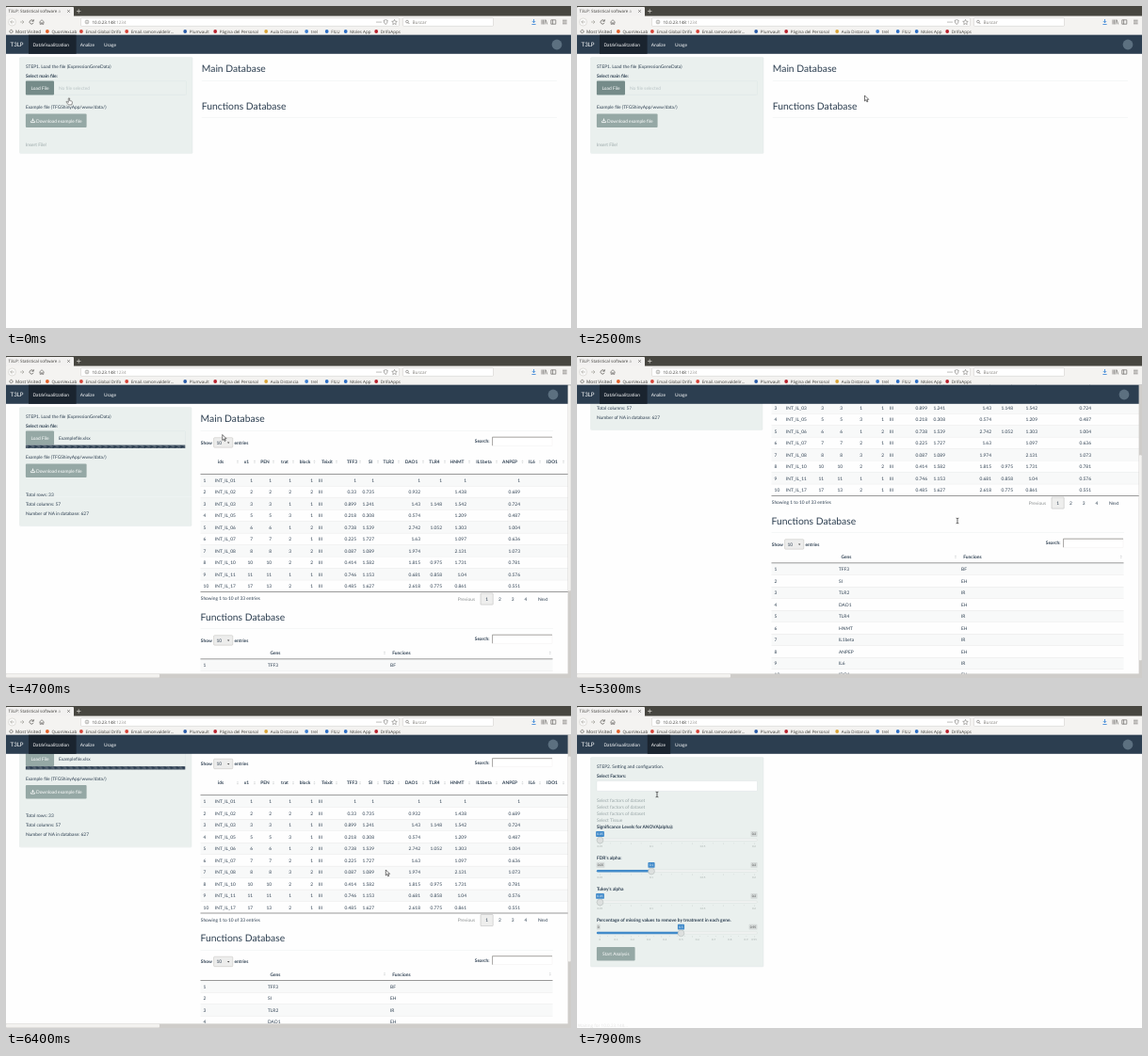
Write an HTML page that moves like this. It is 600 by 342 pixels and loops after 8 s.

```html
<!DOCTYPE html>
<html lang="en">
<head>
<meta charset="utf-8">
<title>T3LP</title>
<style>
html, body { margin: 0; width: 100%; height: 100%; overflow: hidden; background: #fefefe; }
svg { display: block; width: 600px; height: 342px; }
text { font-family: Lato, sans-serif; text-rendering: geometricPrecision; white-space: pre; }
.ui text { font-family: "Open Sans", "Noto Sans", sans-serif; }
</style>
</head>
<body>
<svg id="stage" viewBox="0 0 600 342" xmlns="http://www.w3.org/2000/svg"></svg>
<script>
const LOOP = 8000, TICK = 100;
const INK = '#2c3e50', GREY = '#98a5a6', PANEL = '#eaf0ee', BTN = '#95a8a5', BLUE = '#428bca';

// ---- drawing helpers; y of text is the middle of its capitals ----
const text = (x, y, s, o = {}) => {
  const size = o.size || 4.85;
  return `<text x="${x}" y="${y + size * 0.36}" font-size="${size}" fill="${o.fill || INK}"` +
    ` font-weight="${o.bold ? 700 : 400}" text-anchor="${o.at || 'start'}">${s}</text>`;
};
const bold = (x, y, s, o) => text(x, y, s, { bold: true, ...o });
const mid = (x, y, s, o) => text(x, y, s, { at: 'middle', ...o });
const rect = (x, y, x2, y2, fill, more = '') =>
  `<rect x="${x}" y="${y}" width="${x2 - x}" height="${y2 - y}" fill="${fill}" ${more}/>`;
const box = (x, y, x2, y2, fill, line, r = 1) =>
  rect(x, y, x2, y2, fill, `rx="${r}" stroke="${line}" stroke-width=".4"`);
const path = (d, line, width = 0.6, fill = 'none') =>
  `<path d="${d}" stroke="${line}" stroke-width="${width}" fill="${fill}"/>`;
const dot = (x, y, r, fill, more = '') => `<circle cx="${x}" cy="${y}" r="${r}" fill="${fill}" ${more}/>`;
const group = (id, body) => `<g id="${id}">${body}</g>`;
const hr = (y, x, x2) => rect(x, y, x2, y + 0.4, '#e6ebeb');

// ---- browser frame ----
const bookmarks = [
  [41.7, 'QuonVexLab', '#e2632c'], [77.7, 'Email Global Drifo', '#d5453a'],
  [126, 'Email.ramonvaldelir...', '#d5453a'], [188, 'Plumvault', '#2b5ca8'],
  [220, 'Página del Personal', '#b8232f'], [274, 'Aula Distancia', '#d9a53a'],
  [317, 'trel', '#3f7fd0'], [338.5, 'FILU', '#2f6fc4'],
  [358.5, 'Moles App', '#2f6fc4'], [391, 'DrifoApps', '#b8232f']
];
const browser = () => {
  const line = '#55534f', ui = { size: 4.75, fill: '#3c3b37' };
  return rect(0, 0, 600, 11, '#474640') +
    rect(0, 1, 72, 11.5, '#f2f1f0', 'rx="1"') +
    rect(0, 10.6, 600, 30.4, '#f4f3f1') +
    text(2.5, 5.5, 'T3LP: Statistical software a', { size: 4.5, fill: 'url(#fade)' }) +
    path('M65.2 4.2l2.6 2.6m0-2.6l-2.6 2.6', line) +
    path('M75 5.5h4.4M77.2 3.3v4.4', '#d8d6d0', 0.7) +
    dot(6.5, 17, 4, '#fbfbfa', 'stroke="#bbb8b2" stroke-width=".4"') +
    path('M8.6 17H4.8m1.7-1.8L4.7 17l1.8 1.8', '#a4a29d', 0.7) +
    path('M15 17h4m-1.8-1.8L19 17l-1.8 1.8', '#a4a29d', 0.7) +
    path('M28.9 15.8a2.1 2.1 0 1 0 .2 2M29.3 14.2v2h-2', line, 0.7) +
    path('M35.4 17.2L38 14.7l2.6 2.5M36.2 16.8v2.6h1.2v-1.6h1.2v1.6h1.2v-2.6', line, 0.6) +
    box(79.5, 12.7, 417.5, 21.4, '#fff', '#c0bdb8') +
    dot(86, 17, 1.9, 'none', `stroke="${line}" stroke-width=".4"`) + path('M86 16.6v1.6M86 15.6v.5', line, 0.5) +
    text(91.5, 17, '10.0.23.148<tspan fill="#9a9894">:1234</tspan>', { ...ui, size: 4.55 }) +
    [394, 396, 398].map(x => dot(x, 17, 0.5, line)).join('') +
    path('M401.2 15.2q2 0 2-.7q0 .7 2 .7q0 3.2-2 4.4q-2-1.2-2-4.4z', line, 0.5) +
    path('M412.5 14.4l.8 1.8 2 .2-1.5 1.3.4 2-1.7-1-1.7 1 .4-2-1.5-1.3 2-.2z', line, 0.45) +
    box(421.5, 12.7, 517.5, 21.4, '#fff', '#c0bdb8') +
    dot(426, 16.6, 1.4, 'none', `stroke="${line}" stroke-width=".5"`) + path('M427 17.6l1.4 1.4', line) +
    text(431.5, 17, 'Buscar', { ...ui, fill: '#84827d' }) +
    path('M560.5 14v3.6m-1.7-1.6l1.7 1.8 1.7-1.8M558.4 19.5h4.2', '#2f7fd6', 0.8) +
    path('M569 14.5v5M570.6 14.5v5M572.2 14.5v5M573.2 14.6l1.4 4.8', line) +
    path('M578.8 14.8h5v4.4h-5zM580.6 14.8v4.4', line) +
    path('M591 15.2h4.6M591 17h4.6M591 18.8h4.6', line) +
    dot(5.5, 27, 1.6, 'none', `stroke="${line}" stroke-width=".9" stroke-dasharray=".9 .35"`) +
    text(10, 27, 'Most Visited', ui) +
    bookmarks.map(([x, s, c]) => dot(x + 2.2, 27, 1.9, c) + text(x + 6.8, 27, s, { ...ui, size: 4.5 })).join('');
};

const navbar = () =>
  rect(0, 30.4, 600, 50.8, INK) +
  `<rect id="tab" y="30.4" height="20.4" fill="#1a242f"/>` +
  text(4.5, 41, 'T3LP', { size: 6.15, fill: '#fff' }) +
  [[28.5, 'DataVisualitzation'], [78.7, 'Analize'], [104, 'Usage']]
    .map(([x, s]) => text(x, 41.2, s, { fill: '#fff' })).join('') +
  dot(585, 41, 5.4, '#5c7080', 'id="logo"');

// ---- first step: file panel ----
const filePanel = (right, loaded, facts, dark) =>
  box(14.5, 54.6, right, facts ? 180.6 : 156.6, PANEL, '#dfe6e5') +
  text(20.9, 64, 'STEP1. Load the file (ExpressionGeneData)') +
  bold(20.9, 74, 'Select main file:') +
  box(51, 79.7, right - 6.5, 94.4, PANEL, '#d9e2e4') +
  rect(20.9, 79.5, 51, 94.6, dark ? '#758b89' : BTN, 'rx="1"') +
  mid(36, 87, 'Load File', { fill: '#fff' }) +
  text(56, 87, loaded ? 'Examplefile.xlsx' : 'No file selected', { fill: loaded ? INK : '#b9c3c5' }) +
  (loaded ? rect(20.9, 94.6, right - 6.7, 98, INK) +
    rect(20.9, 94.6, right - 6.7, 98, 'url(#stripes)') : '') +
  text(20.9, 107.5, 'Example file (TFGShinyApp/www/data/)') +
  rect(20.9, 114.4, 85.6, 129.1, BTN, 'rx="1"') +
  path('M28.5 119.5v2.4m-1.2-1l1.2 1.3 1.2-1.3M26.4 122.2v1.4h4.2v-1.4', '#fff', 0.8) +
  text(32, 121.8, 'Download example file', { fill: '#fff' }) +
  (facts ? facts.map((s, i) => text(20.9, 147 + i * 10.1, s)).join('')
    : text(20.9, 147, 'Insert File!', { fill: GREY }));

const emptyPage = loaded =>
  filePanel(198, loaded, null, !loaded) +
  text(207.8, 66.5, 'Main Database', { size: 10.35 }) + hr(79.3, 207.8, 585) +
  text(207.8, 105.8, 'Functions Database', { size: 10.35 }) + hr(118.3, 207.8, 585);

// ---- tables ----
const PITCH = 12.47;
const heads = [['ids', 228, 246], ['x1', 255.5, 264], ['PEN', 275, 284], ['trat', 296, 305],
  ['block', 317.5, 327.5], ['Teixit', 341, 351], ['TFF3', 367.5, 376], ['SI', 387, 395],
  ['TLR2', 406.3, 417], ['DAO1', 430.5, 443], ['TLR4', 455, 466], ['HNMT', 479, 492],
  ['IL1beta', 507.5, 521], ['ANPEP', 535, 548.5], ['IL6', 558.5, 567], ['IDO1', 580, 592]];
const rightEdges = [262, 282, 303, 326, 372, 391, 440, 463, 489, 546];
const samples = [
  '01 1 1 1 1 1 1 1 1 1 1', '02 2 2 2 2 0.33 0.735 0.932 - 1.438 0.689',
  '03 3 3 1 1 0.899 1.241 1.43 1.148 1.542 0.724', '05 5 5 3 1 0.218 0.308 0.574 - 1.209 0.487',
  '06 6 6 1 2 0.738 1.539 2.742 1.052 1.303 1.004', '07 7 7 2 1 0.225 1.727 1.63 - 1.097 0.636',
  '08 8 8 3 2 0.087 1.089 1.974 - 2.131 1.073', '10 10 10 2 2 0.414 1.582 1.815 0.975 1.731 0.781',
  '11 11 11 1 1 0.746 1.153 0.681 0.858 1.04 0.576', '17 17 13 2 1 0.485 1.627 2.618 0.775 0.861 0.551'];
const genes = 'TFF3:BF SI:EH TLR2:IR DAO1:EH TLR4:IR HNMT:EH IL1beta:IR ANPEP:EH IL6:IR IDO1:EH'.split(' ');

const sorter = (x, y) => path(`M${x - 1.1} ${y - 0.5}l1.1-1.3 1.1 1.3zM${x - 1.1} ${y + 0.5}l1.1 1.3 1.1-1.3z`, 'none', 0, '#cfd2d3');
const controls = y =>
  bold(206.8, y, 'Show') +
  box(220.6, y - 5.3, 240.8, y + 5.2, '#ededec', '#b3b1ad') +
  text(223.5, y, '10') + path(`M235 ${y - 0.6}h2.4l-1.2 1.5z`, 'none', 0, '#444') +
  bold(242.5, y, 'entries') +
  bold(513.6, y - 1.4, 'Search:', { at: 'end' }) +
  rect(516.4, y - 6, 580, y + 3.2, '#fff', 'stroke="#e6e5e3" stroke-width=".3"') +
  path(`M516.6 ${y + 3.2}v-9H580`, '#6f6d69', 0.6);
const stripesAt = (i, top, x2) =>
  rect(206.5, top + i * PITCH, x2, top + (i + 1) * PITCH, i % 2 ? '#fefefe' : '#f8f9f9') +
  (i ? rect(206.5, top + i * PITCH, x2, top + i * PITCH + 0.35, '#dfdfdf') : '');
const rule = (y, x2) => rect(206.5, y - 0.25, x2, y + 0.25, '#333');
const footer = (y, total, pages) => {
  const first = 552 - 13.8 * (pages - 1);
  let s = text(206.8, y, `Showing 1 to 10 of ${total} entries`) +
    text(first - 12.6, y + 0.4, 'Previous', { at: 'end', fill: '#8b8f90' }) +
    box(first - 6.6, y - 5.6, first + 6.6, y + 6.5, '#eeeeed', '#a5a5a5', 0.6);
  for (let p = 1; p <= pages; p++) s += mid(first + (p - 1) * 13.8, y + 0.4, p);
  return s + text(565, y + 0.4, 'Next');
};
const mainTable = () =>
  text(206.6, 66.5, 'Main Database', { size: 10.35 }) + hr(79.3, 206.6, 581) + controls(92) +
  heads.map(([s, x, ax]) => mid(x, 112.2, s, { bold: true }) + sorter(ax, 112.2)).join('') +
  samples.map((line, i) => {
    const [id, ...cells] = line.split(' '), y = 132.2 + i * PITCH;
    return stripesAt(i, 125.6, 600) + text(209.6, y, i + 1) + text(222, y, 'INT_IL_' + id) + text(332, y, 'III') +
      cells.map((c, k) => c === '-' ? '' : text(rightEdges[k], y, c, { at: 'end' })).join('');
  }).join('') +
  rule(125.3, 600) + rule(250.5, 600) + footer(257.6, 33, 4);
const geneTable = () =>
  text(206.6, 277, 'Functions Database', { size: 10.35 }) + hr(289.5, 206.6, 581) + controls(302) +
  bold(280.5, 315.3, 'Gens') + sorter(402, 315.3) + bold(410.3, 315.3, 'Funcions') + sorter(577.8, 315.3) +
  genes.map((g, i) => {
    const [name, role] = g.split(':'), y = 328.5 + i * PITCH;
    return stripesAt(i, 322.2, 580.5) + text(209.6, y, i + 1) + text(278, y, name) + text(408, y, role);
  }).join('') +
  rule(321.9, 580.5) + rule(447, 580.5) + footer(454, 51, 6);
const dataPage = () =>
  filePanel(197, true, ['Total rows: 33', 'Total columns: 57', 'Number of NA in database: 627']) +
  mainTable() + geneTable();

// ---- second step: settings ----
const tag = (x, y, s, on) => {
  const w = s.length * 1.65 + 2.2;
  return rect(x - w / 2, y - 2.9, x + w / 2, y + 2.9, on ? BLUE : '#d5dad9', 'rx=".9"') +
    mid(x, y, s, { size: 3.2, fill: on ? '#fff' : '#444' });
};
const slider = (y, at, value, min, max, labels) => {
  const fine = labels.length > 4, n = fine ? 20 : 15, step = fine ? 17.25 : 54.6;
  let s = rect(20.9, y - 1.2, 191.5, y + 1.2, '#f3f5f4', 'rx="1.2" stroke="#ccd2d1" stroke-width=".35"');
  if (value !== min) s += rect(20.9, y - 1.2, at, y + 1.2, BLUE, 'rx="1.2"') + tag(fine ? 22.8 : 25, y - 6.3, min);
  s += tag(fine ? 187 : 188, y - 6.3, max) + tag(at, y - 6.3, value, true);
  for (let i = 0; i <= n; i++) {
    const x = 24.3 + 163.7 * i / n;
    s += rect(x, y + 3, x + 0.25, y + (i % (n / 5) ? 4 : 4.8), '#b5bcbb');
  }
  labels.forEach((l, i) => {
    s += mid(Math.min(188, 24.3 + step * i), y + 7.1, l, { size: 2.8, fill: '#a3abaa' });
  });
  return s + dot(at, y + 0.3, 3.4, '#dde0df', 'stroke="#a9b0af" stroke-width=".45"');
};
const settingsPage = () => {
  const alphas = ['0.05', '0.1', '0.15', '0.2'];
  const tenths = ['0', ...Array.from({ length: 9 }, (_, i) => '0.' + (i + 1)), '0.95'];
  return box(14.5, 54.6, 198, 277, PANEL, '#dfe6e5') +
    text(20.9, 64, 'STEP2. Setting and configuration.') +
    bold(20.9, 74, 'Select Factors:') + box(20.9, 79.6, 191.5, 90.4, '#fff', '#d3dcde') +
    [0, 1, 2].map(i => text(20.9, 100.4 + i * 7, 'Select factors of dataset', { fill: GREY })).join('') +
    text(20.9, 121.4, 'Select Tissue', { fill: GREY }) +
    bold(20.9, 128.4, 'Significance Levels for ANOVA(alpha):') + slider(142.3, 24.5, '0.05', '0.05', '0.2', alphas) +
    bold(20.9, 161, "FDR's alpha:") + slider(175.2, 79, '0.1', '0.05', '0.2', alphas) +
    bold(20.9, 194, "Tukey's alpha") + slider(208.2, 24.5, '0.05', '0.05', '0.2', alphas) +
    bold(20.9, 227, 'Percentage of missing values to remove by treatment in each gene.') +
    slider(241, 110.5, '0.5', '0', '0.95', tenths) +
    rect(20.9, 256, 61.6, 270.6, BTN, 'rx="1"') + mid(41.2, 263.3, 'Start Analysis', { fill: '#fff' });
};

const VIEW = { top: 31, bottom: 337.4, right: 596.6, max: 121 };
const THUMB = 218, TEAR = 149.5, STRIPE = 6.47;
const bars = () =>
  rect(VIEW.right, 30.4, 600, 342, '#cfcdca') + rect(0, VIEW.bottom, 600, 342, '#cfcdca') +
  rect(0, VIEW.bottom + 0.4, 163, 341.6, '#f3f2f0', 'rx="1"') +
  `<rect id="thumb" x="${VIEW.right + 0.3}" width="2.8" height="${THUMB}" rx="1" fill="#f3f2f0"/>`;
// The screen refreshes in two bands, which may show different scroll positions.
const band = id => `<g clip-path="url(#${id}Clip)"><use id="${id}" href="#page"/></g>`;

const pointers =
  group('arrow', path('M0 0v6l1.4-1.3 1 2.2 1-.4-1-2.2h1.9z', '#1c1c1c', 0.6, '#fff')) +
  group('ibeam', path('M-1.4-2.8q1.4 0 1.4.8q0-.8 1.4-.8M0-2v4M-1.4 2.8q1.4 0 1.4-.8q0 .8 1.4.8', '#222', 0.7)) +
  group('hand', path('M-.7 0q.7-.9 1.3 0v2.6l2.1.5q.8.3.7 1.2l-.5 2.6h-3.6l-2.4-3q.2-1 1.2-.3l1.2 1z', '#222', 0.5, '#fff'));

document.getElementById('stage').innerHTML = `<defs>
  <linearGradient id="fade" gradientUnits="userSpaceOnUse" x1="52" x2="63" y1="0" y2="0">
    <stop stop-color="#3c3b37"/><stop offset="1" stop-color="#3c3b37" stop-opacity="0"/></linearGradient>
  <pattern id="stripes" width="${STRIPE}" height="${STRIPE}" patternUnits="userSpaceOnUse">
    <path transform="scale(${STRIPE / 4})" d="M0 0h1L4 3v1zM2 0h2v2zM0 2v2h2z" fill="#fff" fill-opacity=".2"/></pattern>
  <clipPath id="upperClip">${rect(0, 30, 600, TEAR)}</clipPath>
  <clipPath id="lowerClip">${rect(0, TEAR, 600, 342)}</clipPath>
  ${group('page', dataPage())}</defs>` +
  rect(0, 0, 600, 342, '#fefefe') +
  group('idle', emptyPage(false)) + group('upload', emptyPage(true)) +
  group('data', band('upper') + band('lower')) + group('settings', settingsPage()) +
  navbar() + group('bars', bars()) + `<g class="ui">${browser()}` +
  group('status', group('plate', box(-1, 335, 68, 343, '#f2f1f0', '#cfcdca')) +
    text(1, 339, 'Waiting for 10.0.23.148...', { size: 4.6, fill: '#55534f' })) + '</g>' + pointers;

// ---- motion: [time, value...] ----
const cursor = [
  [0, 67, 98, 'hand'], [1900, 74, 106, 'arrow'], [2000, 100, 124], [2100, 148, 139], [2200, 202, 138],
  [2300, 252, 122], [2400, 289, 104], [2500, 305.5, 95], [2700, 284, 91], [2800, 220, 80],
  [2900, 155, 68], [3000, 121.3, 63.5], [3200, 119, 65], [3300, 117, 66.5],
  [4400, 135, 68], [4500, 175, 75], [4600, 212, 81], [4700, 229.8, 83.5], [4800, 300, 122],
  [4900, 372, 160], [5000, 404, 175, 'ibeam'], [5400, 403.3, 174, 'arrow'], [6800, 385, 165], [6900, 310, 125],
  [7000, 215, 82], [7100, 140, 55], [7200, 98, 43, 'hand'], [7300, 87, 40, 'hand'],
  [7500, 87, 54, 'arrow'], [7600, 87, 67], [7700, 87, 73], [7800, 86, 84], [7900, 85, 94, 'ibeam']];
// upper band, and lower band where it lags behind
const scroll = [[0, 0], [5000, 12], [5100, 42], [5200, 78], [5300, 102], [5400, 113], [5500, 119], [5600, 121],
  [5900, 115.5, 121], [6000, 110], [6100, 97], [6200, 76], [6300, 52], [6400, 30.5], [6500, 14], [6600, 4], [6700, 0]];
const scenes = [[0, 'idle'], [4100, 'upload'], [4300, 'data'], [7400, 'settings']];

const at = (table, t) => table.filter(k => k[0] <= t).pop();
const el = id => document.getElementById(id);
const show = (id, on) => { el(id).style.display = on ? '' : 'none'; };
const move = (id, x, y) => el(id).setAttribute('transform', `translate(${x} ${y})`);

function draw(now) {
  const t = Math.floor((now % LOOP) / TICK) * TICK;
  const scene = at(scenes, t)[1];
  scenes.forEach(([, id]) => show(id, id === scene));
  show('bars', scene === 'data');
  move('logo', scene === 'data' ? -4 : 0, 0);

  const [, upper, lower = upper] = at(scroll, t);
  move('upper', 0, -upper);
  move('lower', 0, -lower);
  el('thumb').setAttribute('y', VIEW.top + 0.4 + lower / VIEW.max * (VIEW.bottom - VIEW.top - THUMB - 0.8));
  el('stripes').setAttribute('patternTransform', `translate(${-2 * STRIPE * (t % 2000) / 2000} 0)`);

  const second = scene === 'settings';
  el('tab').setAttribute('x', second ? 74.8 : 24);
  el('tab').setAttribute('width', second ? 24.4 : 50.6);
  show('status', t >= 7500);
  show('plate', t < 7900);
  el('status').style.opacity = t < 7900 ? 1 : 0.15;

  const [, cx, cy, kind = 'arrow'] = at(cursor, t);
  for (const id of ['arrow', 'ibeam', 'hand']) {
    show(id, id === kind);
    move(id, cx, cy);
  }
}

const start = performance.now();
function loop() {
  draw(performance.now() - start);
  requestAnimationFrame(loop);
}
loop();
</script>
</body>
</html>
```
